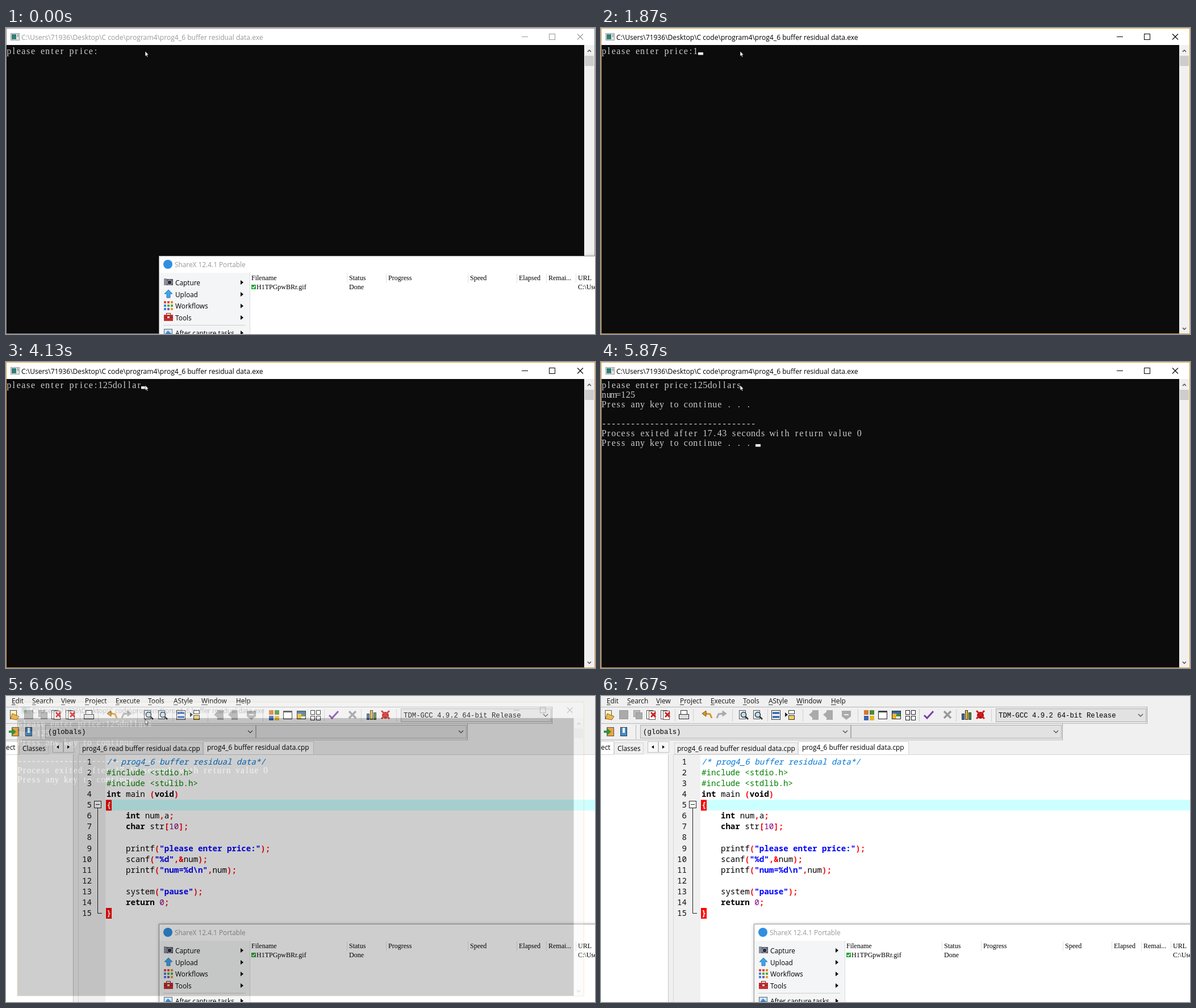
An HTML page with a canvas that plays this animation: 1037 by 540 pixels, repeating every 8470 ms.

```html
<!DOCTYPE html>
<html lang="en">
<head>
<meta charset="utf-8">
<title>Console session</title>
<style>
html, body { margin: 0; width: 100%; height: 100%; overflow: hidden; background: #fff; }
canvas { display: block; }
</style>
</head>
<body>
<canvas id="stage" width="1037" height="540"></canvas>
<script>
const W = 1037, H = 540, LOOP = 8470;
const UI = '11.85px "Open Sans", sans-serif';
const TITLE = '12.07px "Open Sans", sans-serif';
const SERIF = '12px "Liberation Serif", serif';
const MONO = '12.3px "Liberation Mono", monospace';
const CELL = 8.48;
const stage = document.getElementById('stage').getContext('2d');
let g = stage;

function layer(paint) {
  const canvas = document.createElement('canvas');
  canvas.width = W;
  canvas.height = H;
  g = canvas.getContext('2d');
  paint();
  g = stage;
  return canvas;
}
function box(x, y, w, h, color) {
  g.fillStyle = color;
  g.fillRect(x, y, w, h);
}
function frame(x, y, w, h, color, fill) {
  if (fill) box(x, y, w, h, fill);
  g.strokeStyle = color;
  g.lineWidth = 1;
  g.strokeRect(x + .5, y + .5, w - 1, h - 1);
}
function path(points, stroke, width = 1, fill) {
  g.beginPath();
  for (let i = 0; i < points.length; i += 2) g.lineTo(points[i], points[i + 1]);
  if (fill) {
    g.closePath();
    g.fillStyle = fill;
    g.fill();
  }
  if (stroke) {
    g.strokeStyle = stroke;
    g.lineWidth = width;
    g.stroke();
  }
}
function disc(x, y, r, fill, stroke, width = 1.5) {
  g.beginPath();
  g.arc(x, y, r, 0, 7);
  if (fill) { g.fillStyle = fill; g.fill(); }
  if (stroke) { g.strokeStyle = stroke; g.lineWidth = width; g.stroke(); }
}
function text(s, x, y, font, color = '#000', align = 'left') {
  g.font = font;
  g.fillStyle = color;
  g.textAlign = align;
  g.fillText(s, x, y);
}
function cross(x, y, r, color, width) {
  path([x - r, y - r, x + r, y + r], color, width);
  path([x - r, y + r, x + r, y - r], color, width);
}
function chevron(x, y, dir, color = '#444') {
  path([x - 4, y - 2 * dir, x, y + 2 * dir, x + 4, y - 2 * dir], color, 1.2);
}
function tiles(x, y, n, size, gap, colors, outline) {
  for (let i = 0; i < n * n; i++) {
    const tx = x + i % n * (size + gap), ty = y + Math.floor(i / n) * (size + gap);
    if (outline) frame(tx, ty, size, size, '#222', '#fff');
    else box(tx, ty, size, size, colors[i % colors.length]);
  }
}

// ---- code editor ----
const code = `/* prog4_6 buffer residual data*/
#include <stdio.h>
#include <stdlib.h>
int main (void)
{
    int num,a;
    char str[10];

    printf("please enter price:");
    scanf("%d",&num);
    printf("num=%d\\n",num);

    system("pause");
    return 0;
}`.split('\n');
const tokens = /(\/\*.*\*\/)|(#.*)|("[^"]*")|\b(int|char|void|return)\b|(\d+)|([A-Za-z_]\w*)|([^\s\w])/g;
const tokenStyles = [['italic', '#0078d7'], ['', '#008000'], ['bold', '#0000ff'], ['bold', '#000'],
  ['', '#800080'], ['', '#000'], ['bold', '#ff0000']];

function paintCode() {
  const font = '14.13px "Noto Sans Mono", monospace';
  box(175, 183, W, 19, '#ccffff');
  code.forEach((line, i) => {
    const y = 121 + i * 19.07;
    text(i + 1, 151, y, font, '#111', 'right');
    for (const m of line.matchAll(tokens)) {
      const [style, color] = tokenStyles[m.slice(1).findIndex(Boolean)];
      const x = 177 + m.index * CELL, brace = /[{}]/.test(m[0]);
      if (brace) box(176, y - 14, 10, 19, '#ff0000');
      text(m[0], x, y, style + ' ' + font, brace ? '#fff' : color);
    }
  });
  path([161.5, 198, 161.5, 383.5, 169, 383.5], '#222');
  frame(155, 185, 13, 13, '#222', '#fff');
  box(158, 191, 7, 1, '#222');
}

function page(x, y, color = '#fff') {
  frame(x - 6, y - 8, 12, 16, '#555', color);
}
function magnifier(x, y) {
  page(x - 2, y, '#e8f1fa');
  path([x + 3, y + 3, x + 8, y + 8], '#333', 2.5);
  disc(x, y, 4.5, '#bfe0f5', '#333');
}
function paintToolbar() {
  page(13, 33, '#fff3c8');
  path([8, 40, 11, 31, 23, 36, 19, 42], '#8a6a20', 1, '#f0b64a');
  frame(32, 25, 16, 16, '#999', '#aaa');
  frame(57, 25, 12, 12, '#999', '#bbb');
  frame(61, 29, 12, 12, '#999', '#aaa');
  for (const x of [89, 114]) {
    page(x - 3, 33);
    page(x + 1, 34);
    cross(x + 3, 33, 4, '#d61c1c', 3);
  }
  frame(140, 25, 12, 8, '#333', '#fff');
  frame(137, 32, 18, 9, '#333', '#ddd');
  for (const [x, d, c] of [[187, 1, '#d99a20'], [212, -1, '#aaa']]) {
    path([x + 8 * d, 39, x + 5 * d, 32, x - 3 * d, 31], c, 3);
    path([x - 9 * d, 31, x - 2 * d, 26, x - 2 * d, 36], c === '#aaa' ? c : '#7a5510', 1, c);
  }
  magnifier(251, 33);
  magnifier(276, 33);
  frame(300, 25, 16, 17, '#333', '#fff');
  box(302, 28, 12, 4, '#4472b8');
  box(302, 35, 12, 4, '#4472b8');
  frame(330, 25, 11, 7, '#333', '#fff');
  frame(330, 34, 11, 8, '#333', '#f4d35e');
  path([324, 29, 329, 33, 324, 37], null, 1, '#222');
  for (const x of [375, 400]) {
    box(x - 3, 25, 11, 17, '#aaa');
    path([x - 9, 33, x - 3, 28, x - 3, 38], null, 1, '#aaa');
  }
  path([424, 26, 440, 26, 440, 36, 432, 42, 424, 36], null, 1, '#aaa');
  box(428, 32, 8, 2, '#eee');
  tiles(463, 25, 2, 8, 2, ['#d9772b', '#4a8b35', '#3a66b0', '#e5b52c']);
  frame(488, 26, 16, 15, '#222', '#fff');
  box(488, 26, 16, 3, '#444');
  frame(512, 26, 16, 15, '#222', '#fff');
  box(513, 27, 14, 4, '#3a66b0');
  box(513, 31, 7, 9, '#e5b52c');
  box(520, 31, 7, 5, '#4a8b35');
  tiles(536, 25, 2, 8, 2, [], true);
  path([569, 34, 574, 39, 585, 27], '#7a3fa8', 3);
  cross(610, 33, 6, '#999', 3.5);
  ['#3a66b0', '#e5b52c', '#4a8b35'].forEach((c, i) =>
    frame(635 + i * 6, [31, 25, 29][i], 5, [11, 17, 13][i], '#333', c));
  disc(668, 34, 6, '#a31515');
  cross(668, 33, 7, '#d61c1c', 3);
  for (const x of [130, 162, 231, 293, 355, 452, 560, 625, 687]) box(x, 23, 1, 22, '#cfcfcf');

  frame(10, 55, 13, 16, '#555', '#e9a53a');
  path([5, 61, 11, 61, 11, 57, 18, 63, 11, 69, 11, 65, 5, 65], null, 1, '#2f9440');
  frame(34, 55, 12, 16, '#333', '#3f8fd0');
  box(38, 56, 4, 9, '#fff');
}
function combo(x, y, w, label) {
  frame(x, y, w, 24, '#adadad', '#e2e2e2');
  text(label, x + 5, y + 16, MONO);
  chevron(x + w - 10, y + 12, 1);
}
const ide = layer(() => {
  box(0, 0, W, H, '#f0f0f0');
  const menu = { Edit: 10, Search: 46, View: 97, Project: 139, Execute: 193, Tools: 250,
    AStyle: 295, Window: 344, Help: 405 };
  for (const name in menu) {
    text(name, menu[name], 13, UI, '#111');
    box(menu[name], 15, g.measureText(name[0]).width, 1, '#333');
  }
  for (const [y, w] of [[19, 962], [48, 813]]) {
    box(0, y, w, 1, '#b5b5b5');
    box(0, y + 29, w, 1, '#b5b5b5');
    box(w - 1, y, 1, 30, '#a0a0a0');
  }
  box(61, 51, 1, 25, '#b5b5b5');
  paintToolbar();
  combo(695, 22, 265, 'TDM-GCC 4.9.2 64-bit Release');
  combo(69, 51, 371, '(globals)');
  combo(440, 51, 371, '');

  box(0, 103, 118, H, '#fff');
  box(118, 103, 1, H, '#c4c4c4');
  frame(-1, 80, 24, 24, '#d5d5d5', '#fff');
  text('ect', 0, 95, UI);
  frame(23, 82, 52, 21, '#d5d5d5');
  text('Classes', 29, 97, UI);
  for (const [x, d] of [[82, -1], [101, 1]]) {
    frame(x, 80, 19, 20, '#c4c4c4', '#f7f7f7');
    path([x + 9 - 2 * d, 87, x + 9 + 2 * d, 90, x + 9 - 2 * d, 93], null, 1, '#000');
  }
  frame(129, 82, 218, 21, '#d5d5d5');
  text('prog4_6 read buffer residual data.cpp', 134, 97, UI);
  box(127, 103, W, 1, '#d5d5d5');
  box(175, 104, W, H, '#fff');
  box(127, 103, 1, H, '#d5d5d5');
  frame(347, 80, 195, 24, '#d5d5d5', '#fff');
  text('prog4_6 buffer residual data.cpp', 354, 95, UI);
  paintCode();
});

// ---- capture tool window ----
const captureTool = layer(() => {
  g.shadowColor = 'rgba(0,0,0,.35)';
  g.shadowBlur = 6;
  box(270, 403, W, H, '#fff');
  g.shadowBlur = 0;
  frame(269, 402, W, H, '#999', '#fff');
  disc(285, 417, 8, '#2f8fe0');
  text('ShareX 12.4.1 Portable', 297, 422, UI, '#999');
  box(270, 432, 160, H, '#f4f5f6');
  box(429, 432, 1, H, '#dcdcdc');
  ['Capture', 'Upload', 'Workflows', 'Tools', 'After capture tasks'].forEach((s, i) => {
    const y = [449, 470, 490.5, 511, 538][i];
    text(s, 298, y + 4.5, UI);
    path([413, y - 4, 418, y, 413, y + 4], null, 1, '#000');
  });
  box(277, 524, 144, 1, '#cfcfcf');
  box(278, 443, 16, 11, '#555b66');
  box(278, 442, 5, 12, '#888e99');
  disc(288, 449, 4, '#2c2c38', '#aab');
  path([286, 462, 293, 469, 289, 469, 289, 476, 283, 476, 283, 469, 279, 469], '#2a7cc0', 1, '#42a3e8');
  tiles(278, 482, 3, 4, 2, ['#e04a3a', '#e04a3a', '#e58a2c', '#3d84d6', '#58a83f', '#58a83f', '#3d84d6', '#7a58b8', '#e0a32c']);
  frame(282, 503, 8, 5, '#7d1a1a');
  box(278, 506, 16, 11, '#c22f2c');
  box(278, 510, 16, 1, '#7d1a1a');
  box(284, 509, 4, 3, '#ddd');
  frame(278, 531, 15, 12, '#567', '#cfe5f7');
  path([280, 540, 285, 534, 292, 540], null, 1, '#4a86c0');

  const columns = { Filename: 432, Status: 604, Progress: 673, Speed: 817, Elapsed: 903, 'Remai...': 955, URL: 1007 };
  for (const name in columns) {
    text(name, columns[name], 445, SERIF);
    if (columns[name] > 432) box(columns[name] - 4, 433, 1, 17, '#e2e2e2');
  }
  box(432, 453, 8, 8, '#28a33a');
  path([433.5, 457, 435.5, 459, 438.5, 455], '#fff', 1.3);
  text('H1TPGpwBRr.gif', 441, 461, SERIF);
  text('Done', 604, 461, SERIF);
  text('C:\\Users', 1007, 461, SERIF);
});

// ---- console ----
const pressKey = 'Press any key to continue . . . ';
const session = 'please enter price:125dollars\nnum=125\n' + pressKey + '\n\n' + '-'.repeat(32) +
  '\nProcess exited after 17.43 seconds with return value 0\n' + pressKey;
// [time, characters shown, caret visible]
const steps = [[0, 19, 0], [800, 19, 1], [1200, 20, 1], [1270, 20, 0], [1870, 20, 1], [2070, 21, 1],
  [2330, 22, 1], [2870, 22, 0], [3000, 23, 1], [3200, 24, 1], [3330, 25, 1], [3530, 26, 1],
  [3800, 27, 1], [3870, 27, 0], [4130, 28, 1], [4400, 29, 1], [4470, 29, 0], [5000, 29, 1],
  [5130, 38, 1], [5270, 70, 1], [5800, 70, 0], [5870, session.length, 1]];
// [time, opacity, scale]
const closing = [[0, 1, 1], [6530, .78, .988], [6600, .2, .963], [6670, .04, .945], [6730, 0, .94]];
const at = (list, t) => list.findLast(item => item[0] <= t);

function paintConsole(t) {
  const active = t >= 270, ink = active ? '#000' : '#999';
  const [, count, caret] = at(steps, t);
  frame(0, 0, W, H, active ? '#e0a040' : '#8a8a8a', '#fff');
  frame(8, 9, 16, 13, '#999', '#e4e4e4');
  box(10, 11, 8, 9, '#2f7f78');
  box(20, 11, 2, 5, '#8aa');
  text('C:\\Users\\71936\\Desktop\\C code\\program4\\prog4_6 buffer residual data.exe', 27, 20.5, TITLE, ink);
  box(908, 15, 11, 1, ink);
  frame(956, 10, 11, 11, ink);
  cross(1011, 15.5, 5, ink, 1.1);
  box(1, 30, 1017, 509, '#0c0c0c');
  box(1018, 30, 18, 509, '#f0f0f0');
  box(1019, 49, 16, 18, '#cdcdcd');
  path([1024, 42, 1027, 39, 1030, 42], '#444', 1.4);
  path([1024, 529, 1027, 532, 1030, 529], '#444', 1.4);

  const lines = session.slice(0, count).split('\n');
  lines.forEach((line, row) => {
    [...line].forEach((ch, col) =>
      text(ch, 1 + (col + .5) * CELL, 45.5 + row * 17, '16px "Liberation Serif", serif', '#ccc', 'center'));
  });
  if (caret) {
    const row = lines.length - 1;
    box(Math.round(1 + lines[row].length * CELL), 43 + row * 17, 9, 4.5, '#f2f2f2');
  }
}

function paintPointer(t) {
  if (t >= 7670) return;
  const s = Math.max(0, Math.floor((t - 6800) / 66.7));
  let x = 245, y = 41;
  if (s <= 3) {
    x += s * 8;
    y -= s * 6.3;
  } else {
    const k = (s - 3) / 9;
    x = 269 - 241 * k;
    y = 22 + 493 * k;
  }
  g.save();
  g.translate(x, y);
  path([0, 0, 0, 9, 2, 7.2, 3.4, 10.2, 4.8, 9.5, 3.5, 6.6, 6, 6.3], '#000', .6, '#fff');
  g.restore();
}

function draw() {
  const t = performance.now() % LOOP;
  const [, opacity, scale] = at(closing, t);
  stage.drawImage(ide, 0, 0);
  stage.drawImage(captureTool, 0, 0);
  if (opacity) {
    const win = consoleLayer.getContext('2d');
    g = win;
    paintConsole(t);
    g = stage;
    stage.globalAlpha = opacity;
    stage.drawImage(consoleLayer, W / 2 * (1 - scale), H / 2 * (1 - scale), W * scale, H * scale);
    stage.globalAlpha = 1;
  }
  if (t < 270) stage.drawImage(captureTool, 0, 0);
  paintPointer(t);
  requestAnimationFrame(draw);
}
const consoleLayer = layer(() => {});
draw();
</script>
</body>
</html>
```
